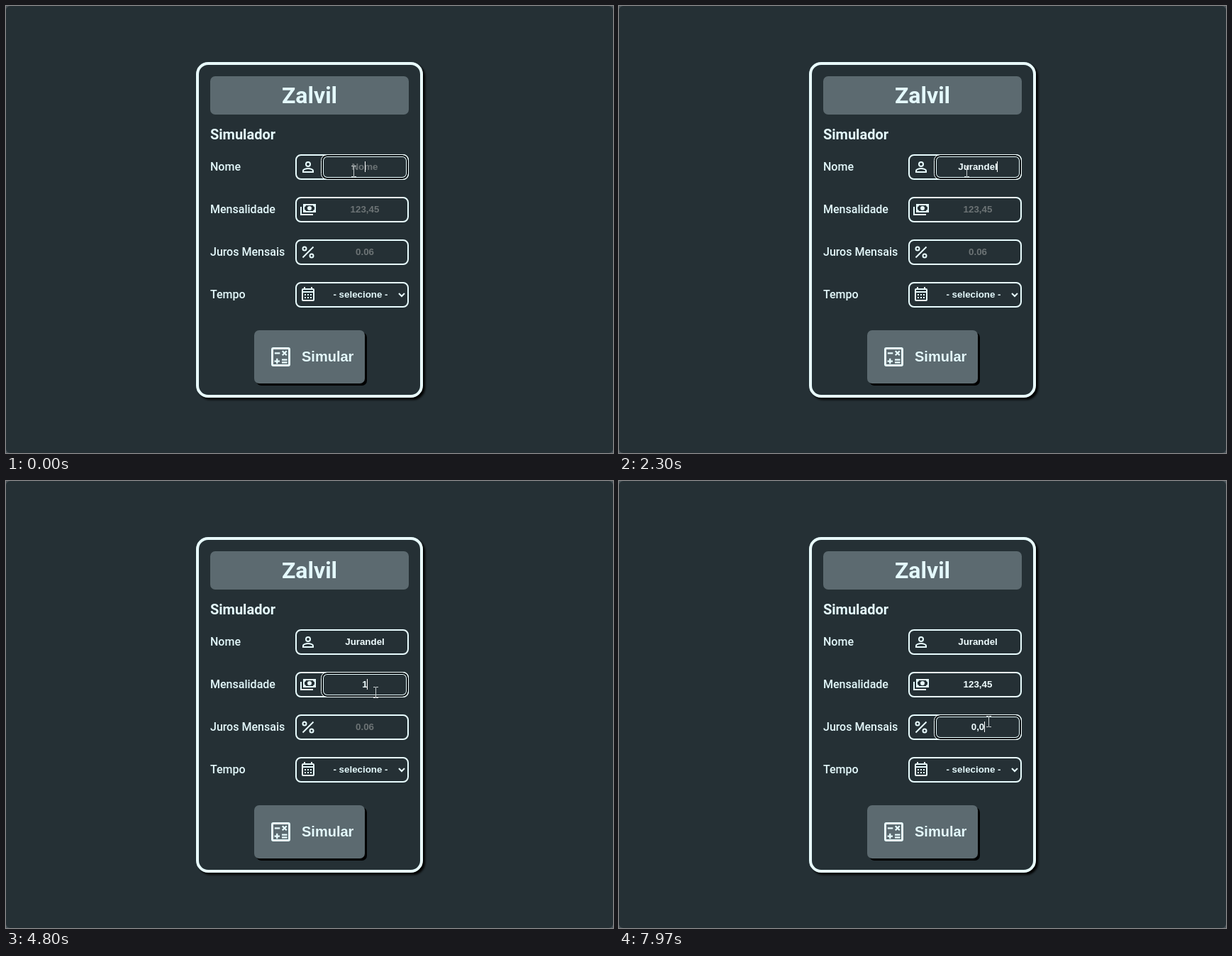
Animation, 856 px wide and 630 px high, one loop 8 s. Source, as an HTML page:

```html
<!DOCTYPE html>
<html lang="pt">
<head>
<meta charset="utf-8">
<style>
  html, body { margin: 0; width: 100%; height: 100%; overflow: hidden; background: #465157; }
  svg { display: block; }
  text { fill: #e4f9fc; font: 500 16px Roboto, sans-serif; }
  .h1 { font-size: 32px; font-weight: 700; }
  .h2 { font-size: 20px; font-weight: 700; }
  .in { font: bold 13.333px "Liberation Sans", Arial, sans-serif; }
  .btn { font: bold 20px "Liberation Sans", Arial, sans-serif; }
  .mid { text-anchor: middle; }
  .line { fill: none; stroke: #e9fdff; stroke-width: 2; }
  .solid { fill: #e9fdff; stroke: none; fill-rule: evenodd; }
</style>
</head>
<body>
<svg width="856" height="630" viewBox="0 0 856 630">
  <defs>
    <filter id="blur"><feGaussianBlur stdDeviation="1.5"/></filter>
    <filter id="soft"><feGaussianBlur stdDeviation=".4"/></filter>
  </defs>
  <rect width="856" height="630" rx="6" fill="#253035"/>
  <rect x="271" y="82" width="320" height="473" rx="17" filter="url(#blur)"/>
  <rect x="270" y="81" width="316" height="469" rx="15" fill="#253035" stroke="#e9fdff" stroke-width="4"/>
  <rect x="288" y="99" width="280" height="54" rx="7" fill="#5c6a70"/>
  <text class="h1 mid" x="428" y="137">Zalvil</text>
  <text class="h2" x="288" y="188">Simulador</text>
  <g id="rows"></g>

  <g class="line" transform="translate(414 215)">
    <circle cx="12" cy="8" r="3"/>
    <path d="M5 19v-2c0-1.7 4-3 7-3s7 1.3 7 3v2z"/>
  </g>
  <path class="solid" transform="translate(414 273)" d="M5 6H23V18H5zM9 8A2 2 0 0 1 7 10V14A2 2 0 0 1 9 16H19A2 2 0 0 1 21 14V10A2 2 0 0 1 19 8zM14 9a3 3 0 0 1 0 6a3 3 0 0 1 0-6M1 10H3V20H19V22H1z"/>
  <g class="line" transform="translate(414 335)">
    <circle cx="7" cy="7" r="2.5"/><circle cx="17" cy="17" r="2.5"/>
    <path d="M19.5 4.5l-15 15"/>
  </g>
  <g class="line" transform="translate(414 395)">
    <rect x="4" y="4" width="16" height="16" rx="1"/>
    <path d="M4 8H20M7 1v3M17 1v3M7 12H17M7 16H17" stroke-dasharray="none"/>
    <path d="M10 10v8M14 10v8" stroke="#253035" style="stroke:#253035"/>
  </g>
  <text class="in mid" x="500" y="411">- selecione -</text>
  <path class="line" d="M554 405l4 4l4-4"/>

  <rect x="353" y="460" width="156" height="75" rx="7" filter="url(#soft)"/>
  <rect x="350" y="457" width="156" height="75" rx="7" fill="#5c6a70"/>
  <g class="line" transform="translate(369.5 476.5) scale(1.5)">
    <rect x="4" y="4" width="16" height="16" rx="1"/>
    <path stroke-width="1.5" style="stroke-width:1.5" d="M6.2 8.5h5M13.5 6.5l4 4M17.5 6.5l-4 4M6 16h5M8.5 13.5v5M13 14.7h5M13 17.3h5"/>
  </g>
  <text class="btn" x="417" y="501">Simular</text>

  <rect id="hover" class="line" x="447" width="118" height="30" rx="6"/>
  <g id="focus" fill="none">
    <rect x="446" y="2" width="120" height="32" rx="7" stroke="#0b1013" stroke-width="2"/>
    <rect x="444.5" y=".5" width="123" height="35" rx="8" stroke="#f4ffff"/>
  </g>
  <g id="values"></g>
  <rect id="caret" width="1" height="15" fill="#fff"/>
  <path id="mouse" fill="none" stroke="#c9d0d2" d="M-3.5-7.5h3l.5 1l.5-1h3M0-7V7M-3.5 7.5h3l.5-1l.5 1h3"/>
</svg>
<script>
const LOOP = 8000, BLINK = 500;
const $ = id => document.getElementById(id);

// Each field: top edge, hint, typed text, focus time and key times
const fields = [
  { y: 209, hint: "Nome", text: "Jurandel", focus: -100,
    keys: Array.from({ length: 8 }, (_, i) => 870 + 190 * i) },
  { y: 269, hint: "123,45", text: "123,45", focus: 3970,
    keys: [4790, 4930, 5270, 5370, 5570, 5700] },
  { y: 329, hint: "0.06", text: "0,0", focus: 6770,
    keys: [7670, 7800, 7930] }
];

// Pointer stops: time, x, y
const stops = [[0, 490, 233], [3200, 490, 233], [3600, 521, 294], [3900, 521, 298],
  [6070, 521, 298], [6450, 521, 339], [LOOP, 521, 339]];

["Nome", "Mensalidade", "Juros Mensais", "Tempo"].forEach((label, i) => {
  const y = 209 + 60 * i;
  $("rows").innerHTML += `<text x="288" y="${y + 23}">${label}</text>
    <rect class="line" x="409" y="${y + 1}" width="158" height="34" rx="7"/>`;
});
$("values").innerHTML = fields.map(f => `<text class="in mid" x="506" y="${f.y + 22}"></text>`).join("");
fields.forEach((f, i) => f.el = $("values").children[i]);

function pointer(t) {
  const i = stops.findIndex((s, k) => k && t <= s[0]);
  const [t0, x0, y0] = stops[i - 1], [t1, x1, y1] = stops[i];
  const p = (t - t0) / (t1 - t0), e = p * p * (3 - 2 * p);
  return [x0 + (x1 - x0) * e, y0 + (y1 - y0) * e];
}

function draw(t) {
  const [mx, my] = pointer(t);
  $("mouse").setAttribute("transform", `translate(${Math.round(mx) + .5} ${Math.round(my)})`);

  for (const f of fields) {
    f.count = f.keys.filter(k => k <= t).length;
    f.el.textContent = f.count ? f.text.slice(0, f.count) : f.hint;
    f.el.style.fill = f.count ? "#f0fdff" : "#6c7375";
  }

  const over = fields.find(f => my >= f.y + 2 && my < f.y + 34);
  $("hover").style.display = over ? "" : "none";
  if (over) $("hover").setAttribute("y", over.y + 3);

  const active = fields.filter(f => f.focus <= t).pop();
  $("focus").setAttribute("transform", `translate(0 ${active.y})`);

  const last = active.count ? active.keys[active.count - 1] : active.focus;
  const width = active.count ? active.el.getComputedTextLength() : 0;
  $("caret").setAttribute("x", Math.round(506 + width / 2 - .3));
  $("caret").setAttribute("y", active.y + 10);
  $("caret").style.display = Math.floor((t - last) / BLINK) % 2 ? "none" : "";
}

const start = performance.now();
function tick() {
  draw((performance.now() - start) % LOOP);
  requestAnimationFrame(tick);
}
tick();
</script>
</body>
</html>
```
